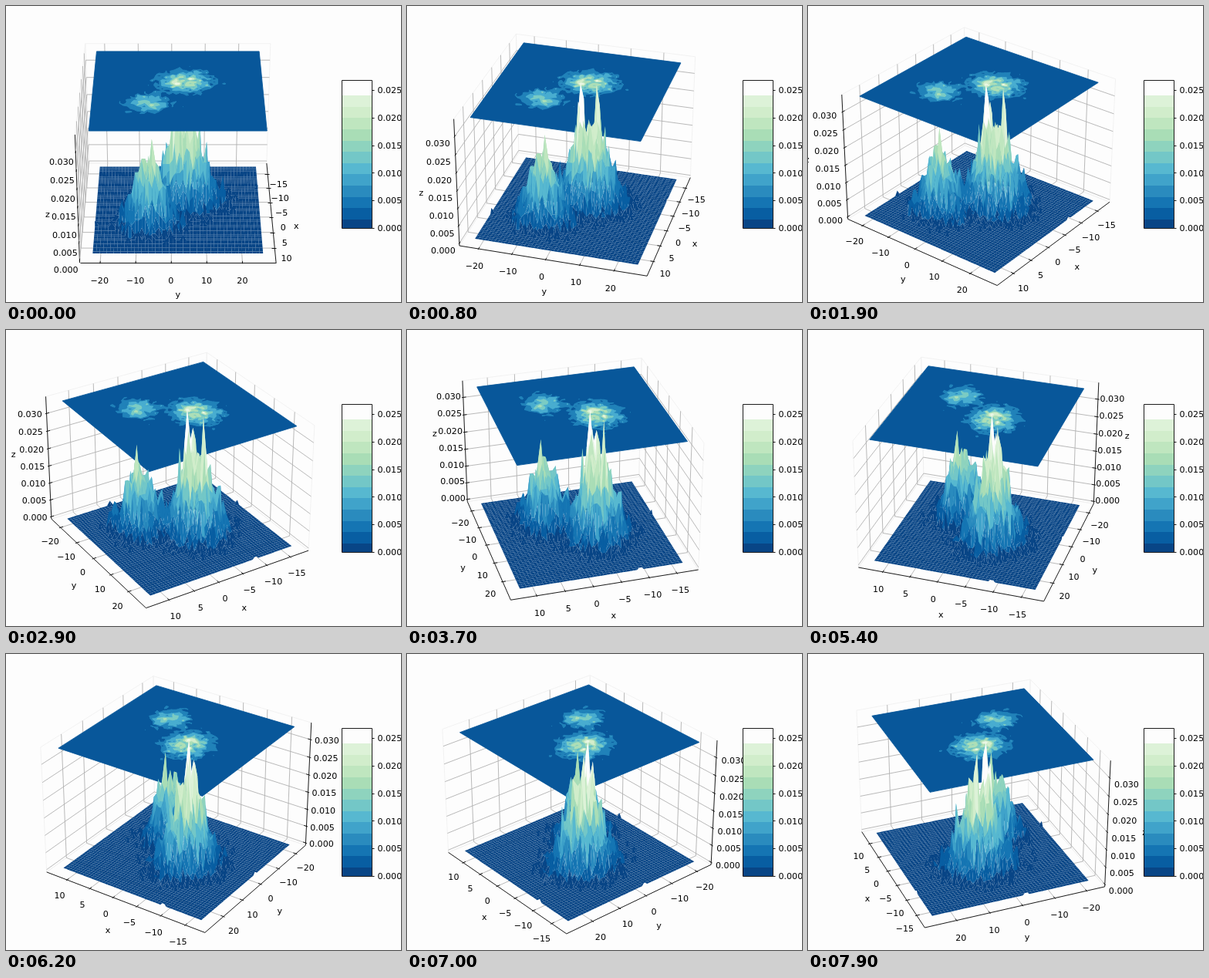
Recreate the animation shown at these times as an HTML page with a canvas. Size 512 by 384 pixels, loop 8000 ms.

```html
<!DOCTYPE html>
<html lang="en">
<head>
<meta charset="utf-8">
<title>Rotating density surface</title>
<style>
html, body { margin: 0; width: 100%; height: 100%; overflow: hidden; background: #fdfdfd; }
canvas { display: block; width: 512px; height: 384px; }
</style>
</head>
<body>
<canvas id="stage" width="512" height="384"></canvas>
<script>
const ctx = document.getElementById('stage').getContext('2d');
const PAPER = '#fdfdfd';
const N = 50;
const TOP = 0.034;
const FACE_MAX = 0.0268;
const QUANTUM = 0.0013;
const AXES = [
  { name: 'x', lo: -18.25, hi: 13.85, from: -15, step: 5, count: 6, digits: 0, tickDir: 1 },
  { name: 'y', lo: -24.65, hi: 28.35, from: -20, step: 10, count: 5, digits: 0, tickDir: 0 },
  { name: 'z', lo: 0, hi: TOP, from: 0, step: 0.005, count: 7, digits: 3, tickDir: 0 }
];
// Box proportions 4:4:3, seen from 30 degrees above
const SIZE = [1.1428, 1.1428, 0.8571];
const CE = Math.cos(Math.PI / 6), SE = 0.5;
const SCALE = 2075.68, CX = 222.8, CY = 186.81, DIST = 10;
const BOX = 0.5 + 1 / 48;
const LINE = 0.89;

// ---------- colours ----------
const RAMP = [[8, 64, 129], [8, 104, 172], [43, 140, 190], [78, 179, 211], [123, 204, 196],
  [168, 221, 181], [204, 235, 197], [224, 243, 219], [247, 252, 240]];

function ramp(t) {
  const p = Math.min(Math.max(t, 0), 1) * 8, i = Math.min(Math.floor(p), 7);
  return 'rgb(' + RAMP[i].map((c, k) => Math.round(c + (RAMP[i + 1][k] - c) * (p - i))) + ')';
}

const LOW = 0.057, HIGH = 0.896, MIDS = 11, STEP = (HIGH - LOW) / MIDS;
const BANDS = [{ from: 0, color: ramp(0.015) }];
for (let i = 0; i < MIDS; i++) BANDS.push({ from: LOW + i * STEP, color: ramp(LOW + (i + 0.5) * STEP) });
BANDS.push({ from: HIGH, color: PAPER });

function tone(z) {
  const t = z / FACE_MAX;
  if (t < LOW) return BANDS[0].color;
  return BANDS[Math.min(Math.floor((t - LOW) / STEP), MIDS) + 1].color;
}

// ---------- height field ----------
let seed = 20717;
function random() {
  seed = (seed + 0x6D2B79F5) | 0;
  let r = Math.imul(seed ^ (seed >>> 15), 1 | seed);
  r = (r + Math.imul(r ^ (r >>> 7), 61 | r)) ^ r;
  return ((r ^ (r >>> 14)) >>> 0) / 4294967296;
}

function poisson(mean) {
  const limit = Math.exp(-mean);
  let n = 0;
  for (let p = random(); p > limit; p *= random()) n++;
  return n;
}

function hill(x, y, h, cx, cy, sx, sy) {
  return h * Math.exp(-(((x - cx) / sx) ** 2 + ((y - cy) / sy) ** 2) / 2);
}

const heights = [];
for (let i = 0; i < N; i++) {
  heights.push([]);
  for (let j = 0; j < N; j++) {
    const x = -16.8 + 29.2 * i / (N - 1), y = -22.25 + 48.2 * j / (N - 1);
    const mean = hill(x, y, 0.0218, -5.2, 4.1, 2.55, 4.8) + hill(x, y, 0.0178, 3, -6.3, 2.1, 3.9);
    heights[i].push(Math.min(poisson(mean / QUANTUM) * QUANTUM, 0.0285));
  }
}
// The tall spikes and two stray bumps on the rim
[[21, 24, 0.034], [21, 25, 0.03], [20, 24, 0.025], [20, 25, 0.022], [22, 24, 0.024], [22, 25, 0.022],
  [18, 28, 0.0328], [13, 49, 0.001], [0, 20, 0.001]].forEach(([i, j, z]) => { heights[i][j] = z; });

// Positions inside the box run from -0.5 to 0.5; data fills 1/1.1 of it
const spread = k => (k / (N - 1) - 0.5) / 1.1;
const place = (axis, value) => (value - axis.lo) / (axis.hi - axis.lo) - 0.5;

const cells = [];
for (let i = 0; i < N - 1; i++) {
  for (let j = 0; j < N - 1; j++) {
    const corners = [[i, j], [i + 1, j], [i + 1, j + 1], [i, j + 1]];
    const z = corners.reduce((s, [a, b]) => s + heights[a][b], 0) / 4;
    cells.push({ corners, color: tone(z), depth: 0 });
  }
}

// Part of a cell that lies above a level
function clip(corners, level) {
  const out = [];
  corners.forEach(([i, j], k) => {
    const [m, n] = corners[(k + 1) % 4];
    const a = heights[i][j], b = heights[m][n];
    if (a >= level) out.push([spread(i), spread(j), 0.5]);
    if ((a >= level) !== (b >= level)) {
      const f = (level - a) / (b - a);
      out.push([spread(i + (m - i) * f), spread(j + (n - j) * f), 0.5]);
    }
  });
  return out;
}

const E = 0.5 / 1.1;
const layers = [{ color: ramp(0.5 / 7), shapes: [[[-E, -E, 0.5], [E, -E, 0.5], [E, E, 0.5], [-E, E, 0.5]]] }];
for (let k = 1; k < 7; k++) {
  layers.push({
    color: ramp((k + 0.5) / 7),
    shapes: cells.map(c => clip(c.corners, k * 0.005)).filter(s => s.length > 2)
  });
}

// ---------- projection ----------
let cosA = 1, sinA = 0;

function toward([x, y, z]) {
  return CE * (x * SIZE[0] * cosA + y * SIZE[1] * sinA) + SE * z * SIZE[2];
}

function project(p) {
  const X = p[0] * SIZE[0], Y = p[1] * SIZE[1], Z = p[2] * SIZE[2];
  const d = DIST - toward(p);
  const right = Y * cosA - X * sinA;
  const up = CE * Z - SE * (X * cosA + Y * sinA);
  return [CX + SCALE * right / d, CY - SCALE * up / d, d];
}

function trace(points, close) {
  points.forEach((p, k) => k ? ctx.lineTo(p[0], p[1]) : ctx.moveTo(p[0], p[1]));
  if (close) ctx.closePath();
}

// Upright and level lines sit on whole pixels
function snap(points) {
  const straight = points.every((p, k) => !k ||
    Math.min(Math.abs(p[0] - points[k - 1][0]), Math.abs(p[1] - points[k - 1][1])) < 0.01);
  return straight ? points.map(p => [Math.round(p[0]) + 0.5, Math.round(p[1]) + 0.5]) : points;
}

function stroke(points, color, close) {
  ctx.strokeStyle = color;
  ctx.beginPath();
  trace(snap(points), close);
  ctx.stroke();
}

// ---------- drawing ----------
function withValue(p, k, value) {
  const q = p.slice();
  q[k] = value;
  return q;
}

function ticksOf(axis) {
  return Array.from({ length: axis.count }, (_, k) => axis.from + k * axis.step);
}

function label(value, digits) {
  return value.toFixed(digits).replace('-', '\u2212');
}

function drawPanes(near, far) {
  for (let k = 0; k < 3; k++) {
    const a = (k + 1) % 3, b = (k + 2) % 3;
    const p1 = withValue(far, a, near[a]), p2 = withValue(p1, b, near[b]);
    stroke([far, p1, p2, withValue(far, b, near[b])].map(project), '#f1f1f1', true);
  }
}

function drawAxis(axis, k, near, far) {
  const edge = k === 2 ? [near[0], far[1], 0] : [near[0], near[1], far[2]];
  const moved = offset => edge.map((v, n) => n === k ? 0 : v + Math.sign(v) * offset);
  const labelBase = moved(0.0665), nameAt = project(moved(0.1447));
  const a = (k + 1) % 3, b = (k + 2) % 3, dir = axis.tickDir, sign = Math.sign(near[dir]);

  stroke([withValue(edge, k, -BOX), withValue(edge, k, BOX)].map(project), '#000');
  ctx.fillStyle = '#000';
  ctx.textAlign = 'center';
  ctx.fillText(axis.name, nameAt[0], nameAt[1] + 2.5);

  for (const value of ticksOf(axis)) {
    const f = place(axis, value), corner = withValue(far, k, f);
    stroke([withValue(corner, a, near[a]), corner, withValue(corner, b, near[b])].map(project), '#b0b0b0');
    const base = withValue(edge, k, f);
    stroke([withValue(base, dir, base[dir] + sign * 0.1 / 12),
      withValue(base, dir, base[dir] - sign * 0.2 / 12)].map(project), '#000');
    const at = project(withValue(labelBase, k, f));
    ctx.fillText(label(value, axis.digits), at[0] - 0.4, at[1] + 7.2);
  }
}

function drawSurface() {
  const points = heights.map((row, i) =>
    row.map((z, j) => project([spread(i), spread(j), z / TOP - 0.5])));
  for (const cell of cells) {
    cell.points = cell.corners.map(([i, j]) => points[i][j]);
    cell.depth = cell.points.reduce((s, p) => s + p[2], 0);
  }
  cells.slice().sort((p, q) => q.depth - p.depth).forEach(cell => {
    ctx.fillStyle = cell.color;
    ctx.beginPath();
    trace(cell.points, true);
    ctx.fill();
  });
}

function drawContours() {
  ctx.lineJoin = 'round';
  for (const layer of layers) {
    ctx.fillStyle = ctx.strokeStyle = layer.color;
    ctx.beginPath();
    layer.shapes.forEach(s => trace(s.map(project), true));
    ctx.fill();
    ctx.stroke();
  }
  ctx.lineJoin = 'miter';
}

function drawColorbar() {
  const x = 435.2, y = 96, w = 38.4, h = 192, base = y + h;
  BANDS.forEach((band, k) => {
    const top = Math.round(base - h * (k + 1 < BANDS.length ? BANDS[k + 1].from : 1));
    const bottom = Math.round(base - h * band.from);
    ctx.fillStyle = band.color;
    ctx.fillRect(435, top, 39, bottom - top);
  });
  stroke([[x, y], [x + w, y], [x + w, base], [x, base]], '#000', true);
  ctx.fillStyle = '#000';
  ctx.textAlign = 'left';
  for (let k = 0; k < 6; k++) {
    const ty = base - h * k * 0.005 / FACE_MAX;
    stroke([[x + w, ty], [x + w + 3.9, ty]], '#000');
    ctx.fillText(label(k * 0.005, 3), x + w + 7.8, ty + 4.2);
  }
}

function draw(degrees) {
  cosA = Math.cos(degrees * Math.PI / 180);
  sinA = Math.sin(degrees * Math.PI / 180);
  const near = [cosA > -1e-9 ? BOX : -BOX, sinA > -1e-9 ? BOX : -BOX, BOX];
  const far = near.map(v => -v);

  ctx.fillStyle = PAPER;
  ctx.fillRect(0, 0, 512, 384);
  ctx.lineWidth = LINE;
  ctx.font = '11.11px "DejaVu Sans", sans-serif';

  drawPanes(near, far);
  AXES.forEach((axis, k) => drawAxis(axis, k, near, far));

  // Whichever layer reaches nearer to the viewer is painted last
  const sheet = toward([place(AXES[0], 0), place(AXES[1], 0), 0.5]);
  const ground = toward([Math.sign(near[0]) * E, Math.sign(near[1]) * E, -0.5]);
  const order = sheet > ground ? [drawSurface, drawContours] : [drawContours, drawSurface];
  order.forEach(paint => paint());
  drawColorbar();
}

let shown = -1;
const start = performance.now();
function tick() {
  const step = Math.floor((performance.now() - start) / 100) % 80;
  if (step !== shown) {
    shown = step;
    draw(step * 2);
  }
  requestAnimationFrame(tick);
}
tick();
</script>
</body>
</html>
```
